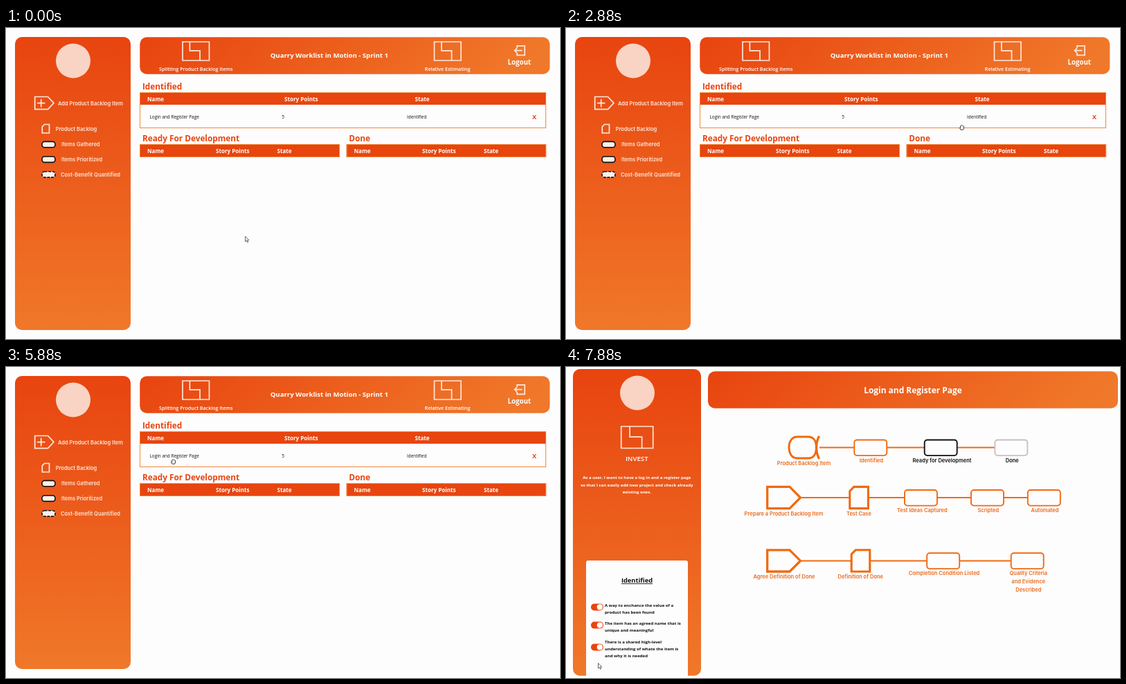
Animation of 800 by 450 pixels, one loop 8 s. Source, as an HTML page:

```html
<!DOCTYPE html>
<html lang="en">
<head>
<meta charset="utf-8">
<title>Backlog board</title>
<style>
  html, body { margin: 0; width: 100%; height: 100%; overflow: hidden; background: #fefdfe; }
  svg { display: block; width: 800px; height: 450px; }
  text { font-family: "Open Sans", "Noto Sans", sans-serif; }
  .inter { font-family: Inter, sans-serif; font-weight: 600; font-size: 7.5px; }
  .mid { text-anchor: middle; }
  .bold { font-weight: 700; }
  .semi { font-weight: 600; }
  .line { fill: none; stroke: #fde8dc; stroke-width: 1.7; }
  .flow { fill: #fefdfe; stroke: #f06a10; }
</style>
</head>
<body>
<svg id="stage" viewBox="0 0 800 450">
  <defs>
    <linearGradient id="down" x2="0" y2="1">
      <stop stop-color="#e8440f"/><stop offset="1" stop-color="#f0782a"/>
    </linearGradient>
    <linearGradient id="across" x2="1" y2="0.1">
      <stop stop-color="#e8440f"/><stop offset="1" stop-color="#f0782a"/>
    </linearGradient>
  </defs>
  <g id="board"></g>
  <g id="detail"></g>
  <g id="sheet"></g>
  <path id="arrow" d="M0 0V7.6L1.8 6 3.1 8.7 4.3 8.1 3 5.5H5.2Z" fill="#fff" stroke="#444" stroke-width=".8"/>
  <path id="hand" d="M-1.6 3.4L-3.1 .7Q-2.8-.4-1.8 .7V-2.2Q-1.1-3.2-.5-2.3 .1-3.4 .8-2.4 1.5-3 2-1.9 2.9-2.2 3-1V1.2L2.2 3.4Z" fill="#fff" stroke="#222" stroke-width=".9"/>
</svg>
<script>
const $ = id => document.getElementById(id);
const ORANGE = '#e8450f', PALE = '#fde6da', LABEL = '#e96a1c';

const text = (x, y, s, size, fill, cls = '') =>
  `<text x="${x}" y="${y}" font-size="${size}" fill="${fill}" class="${cls}">${s}</text>`;
const inter = (x, y, s, fill, cls = '') =>
  `<text x="${x}" y="${y}" fill="${fill}" class="inter ${cls}">${s}</text>`;
const rect = (x, y, w, h, r, attrs) =>
  `<rect x="${x}" y="${y}" width="${w}" height="${h}" rx="${r}" ${attrs}/>`;
const path = (d, attrs) => `<path d="${d}" ${attrs}/>`;
const badge = (x, y) => `<circle cx="${x}" cy="${y}" r="25" fill="#f9d3c3"/>`;
const panels = (x, y, w, h, hx, hy) =>
  rect(x, y, w, h, 10, 'fill="url(#down)"') + rect(hx, hy, 592, 53.5, 10, 'fill="url(#across)"');

function splitIcon(x, y, w, h) {
  return path(`M${x} ${y}h${w}v${h}h${-w}zm${w * .27} 0v${h * .48}h${w * .38}v${h * .52}`, 'class="line"');
}

function table(x, y, w, h, title, columns) {
  const names = ['Name', 'Story Points', 'State'];
  return text(x + 3.4, y - 4.2, title, 11.8, ORANGE, 'bold') +
    rect(x, y, w, h, 0, 'fill="#fefdfe" stroke="#f08a3c"') +
    rect(x + .5, y + .5, w - 1, 17, 0, `fill="${ORANGE}"`) +
    columns.map((cx, i) => text(cx, y + 12.4, names[i], 8.05, '#fff', 'bold')).join('');
}

function pill(y, label, x, dash = '') {
  return rect(52, y, 19, 8.4, 3.6, `fill="#fdf0ea" stroke="#111" stroke-width="1.6" ${dash}`) +
    inter(x, y + 6.9, label, PALE);
}

$('board').innerHTML = panels(13, 13, 167, 424, 193.3, 13.2) + badge(97, 47.5) +
  path('M41.7 99.5H60.5L69 108.6 60.5 117.7H41.7zM50.7 102.8v11.6M44.9 108.6h11.6', 'class="line"') +
  inter(75, 111.5, 'Add Product Backlog Item', PALE) +
  path('M55.5 139.5H62.5V152H52.3V142.8z', 'class="line"') +
  inter(71.7, 148.5, 'Product Backlog', PALE) +
  pill(164.4, 'Items Gathered', 80) +
  pill(186, 'Items Prioritized', 80) +
  pill(207.7, 'Cost-Benefit Quantified', 79, 'stroke-dasharray="4 1.6"') +
  splitIcon(255, 20, 38.5, 27) + splitIcon(618.5, 20, 38.5, 27) +
  text(274.3, 62, 'Splitting Product Backlog Items', 7.1, '#fff', 'semi mid') +
  text(637.6, 62, 'Relative Estimating', 7.1, '#fff', 'semi mid') +
  text(466.8, 43.3, 'Quarry Worklist in Motion - Sprint 1', 9.6, '#fff', 'bold mid') +
  path('M738 29.3v-3.5h11v13.6h-11v-3.5M745.5 32.6h-11m3.2-3.2l-3.2 3.2 3.2 3.2', 'class="line"') +
  text(741.2, 53.3, 'Logout', 9.7, '#fff', 'bold mid') +
  table(193.5, 93.5, 586, 51, 'Identified', [204, 402, 590.5]) +
  table(193.5, 168.5, 288, 18, 'Ready For Development', [204, 303, 391.5]) +
  table(491.8, 168.5, 288, 18, 'Done', [502.5, 601, 690]) +
  text(207.5, 130.5, 'Login and Register Page', 6.4, '#111') +
  text(398.2, 130.5, '5', 6.4, '#111') +
  text(579, 130.5, 'Identified', 6.4, '#111') +
  text(763, 131.6, 'X', 9, ORANGE, 'bold mid');

const link = (x1, x2, y) => path(`M${x1} ${y}H${x2}`, 'stroke="#f06a10" stroke-width="2"');
const state = (x, y, color = '#f06a10') =>
  rect(x, y, 47, 22.6, 4, `fill="#fefdfe" stroke="${color}" stroke-width="1.9"`);
const label = (x, y, s, fill = LABEL) => inter(x, y, s, fill, 'mid');
const activity = y => path(`M290.7 ${y}H323L338.5 ${y + 15.6} 323 ${y + 31.2}H290.7z`, 'class="flow" stroke-width="3.3"');
const sheetIcon = (x, y) => path(`M${x + 6} ${y}h20.6v31.2h-26.6v-25z`, 'class="flow" stroke-width="3.1"');
const lines = (x, y, step, rows, draw) => rows.map((s, i) => draw(x, y + i * step, s)).join('');

$('detail').innerHTML = rect(0, 0, 800, 450, 0, 'fill="#fefdfe"') +
  panels(10, 3, 185, 443.7, 205, 6.2) + badge(103, 37.5) +
  splitIcon(79.7, 86, 46, 31.5) +
  text(102.3, 135.6, 'INVEST', 9.7, '#fff', 'semi mid') +
  lines(102.3, 162.4, 10.1, [
    'As a user, I want to have a log in and a register page',
    'so that I can easily add new project and check already',
    'existing ones.'
  ], (x, y, s) => text(x, y, s, 6.05, '#fff', 'bold mid')) +
  text(501, 38, 'Login and Register Page', 11.95, '#fff', 'bold mid') +

  link(366, 619, 116.6) +
  path('M334 101H350C358 101 361.5 108 361.5 116.5S358 132 350 132H334C326 132 322 125 322 116.5S326 101 334 101z', 'class="flow" stroke-width="3"') +
  path('M365.5 100C362.5 106 361.5 112 361.5 116.5S362.5 127 365.5 133', 'fill="none" stroke="#f06a10" stroke-width="3.4"') +
  state(416.3, 105.5) + state(517.7, 105.5, '#111') + state(619.4, 105.5, '#c4c2c4') +
  label(343.5, 142.4, 'Product Backlog Item') + label(441, 137.5, 'Identified') +
  label(543, 137.5, 'Ready for Development', '#111') + label(644.3, 137.5, 'Done', '#111') +

  link(339, 667, 189) + activity(173.4) + sheetIcon(409.8, 173.4) +
  state(489, 178) + state(585, 178) + state(666.8, 178) +
  label(314.5, 215, 'Prepare a Product Backlog Item') + label(423, 215, 'Test Case') +
  label(514.3, 210.3, 'Test Ideas Captured') + label(609.8, 210.3, 'Scripted') + label(691.5, 210.3, 'Automated') +

  link(339, 643, 280.4) + activity(264.8) + sheetIcon(412.2, 264.8) +
  state(521.2, 269.3) + state(642.7, 269.3) +
  label(315, 306.2, 'Agree Definition of Done') + label(425.3, 306.2, 'Definition of Done') +
  label(546, 301.3, 'Completion Condition Listed') +
  lines(667.8, 301.3, 11.6, ['Quality Criteria', 'and Evidence', 'Described'], label.length ? (x, y, s) => label(x, y, s) : label);

function check(toggleY, textY, rows) {
  return rect(36, toggleY - 5, 18, 10, 5, `fill="${ORANGE}"`) +
    `<circle cx="48.8" cy="${toggleY}" r="4.1" fill="#fff"/>` +
    lines(56, textY, 10, rows, (x, y, s) => text(x, y, s, 6.05, '#111', 'bold'));
}

$('sheet').innerHTML = path('M29 447V283Q29 280 32 280H173Q176 280 176 283V447z', 'fill="#fefdfe"') +
  text(102.5, 312, 'Identified', 9.3, '#111', 'bold mid') +
  path('M80 313.6h45', 'stroke="#111" stroke-width=".9"') +
  check(347.4, 346.6, ['A way to enchance the value of a', 'product has been found']) +
  check(373.6, 373.2, ['The item has an agreed name that is', 'unique and meaningful']) +
  check(405.4, 400, ['There is a shared high-level', 'understanding of whate the item is', 'and why it is needed']);

// Pointer stops: time, x, y
const stops = [
  [0, 345, 301], [1000, 549, 209], [1875, 552, 208], [2875, 571, 143], [4000, 217, 68],
  [5250, 241, 136], [6000, 241, 136], [6625, 419, 121], [6875, 426, 119], [7875, 46, 428]
];
const LOOP = 8000, STEP = 125, OPEN_DETAIL = 6125, OPEN_SHEET = 7000;

function pointer(t) {
  const i = stops.findIndex(s => s[0] > t);
  if (i < 0) return stops[stops.length - 1].slice(1);
  const [t0, x0, y0] = stops[i - 1], [t1, x1, y1] = stops[i];
  const p = (t - t0) / (t1 - t0), e = p * p * (3 - 2 * p);
  return [x0 + (x1 - x0) * e, y0 + (y1 - y0) * e];
}

const show = (id, on) => $(id).setAttribute('visibility', on ? 'visible' : 'hidden');

function draw(now) {
  const t = Math.floor(now % LOOP / STEP) * STEP;
  const [x, y] = pointer(t);
  const onDetail = t >= OPEN_DETAIL;
  const overRow = !onDetail && x > 193 && x < 780 && y > 111 && y < 145;
  show('board', !onDetail);
  show('detail', onDetail);
  show('sheet', t >= OPEN_SHEET);
  show('arrow', !overRow);
  show('hand', overRow);
  $('arrow').setAttribute('transform', `translate(${x + .5} ${y + .5})`);
  $('hand').setAttribute('transform', `translate(${x + .5} ${y + .8})`);
  requestAnimationFrame(draw);
}
requestAnimationFrame(draw);
</script>
</body>
</html>
```
